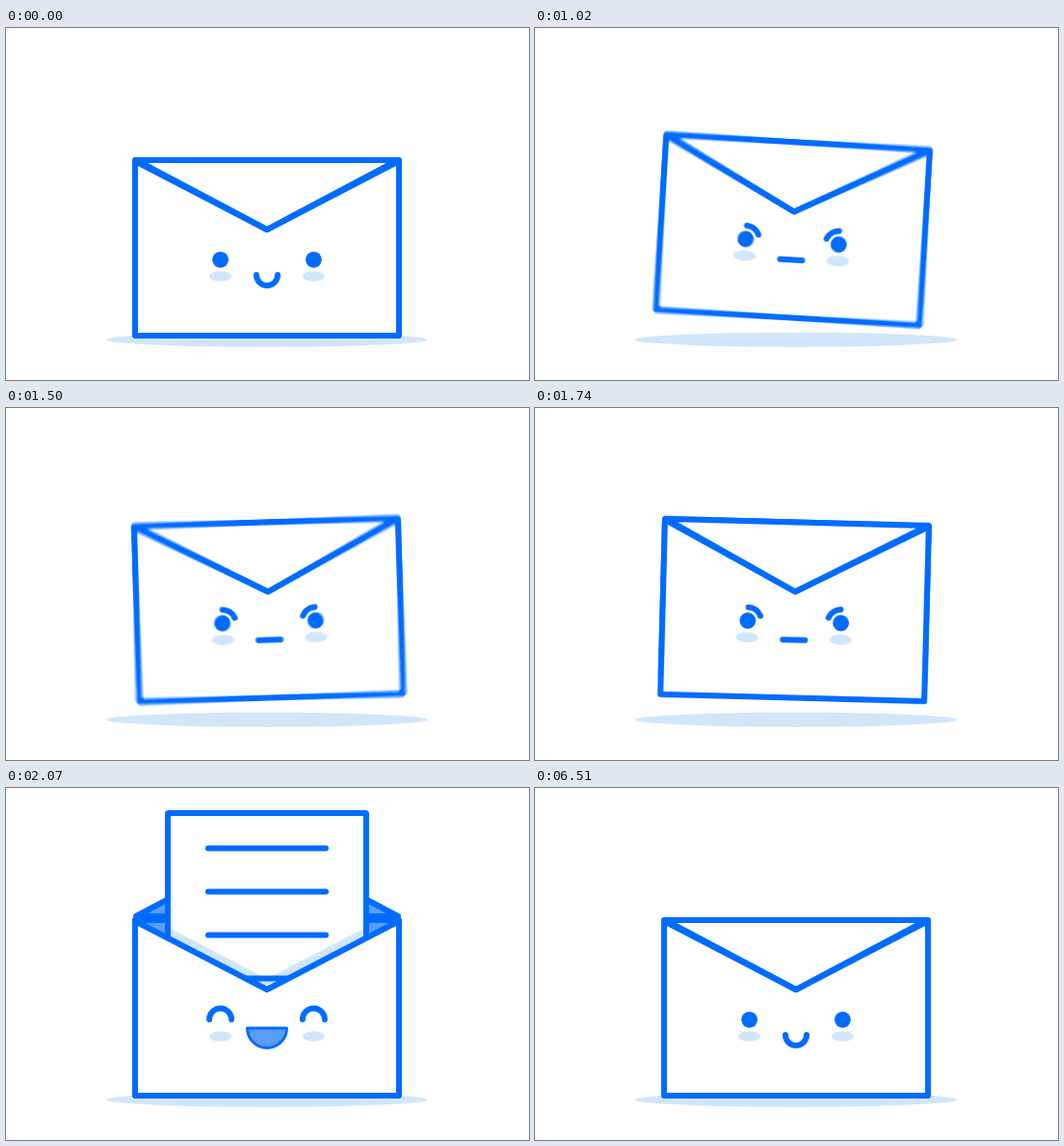
An HTML page with a canvas that plays this animation: 543 px wide and 365 px high, repeating every 7170 ms.

```html
<!DOCTYPE html>
<html lang="en">
<head>
<meta charset="utf-8">
<title>Envelope</title>
<style>
html, body { margin: 0; width: 100%; height: 100%; overflow: hidden; background: #fff; }
canvas { display: block; }
</style>
</head>
<body>
<canvas id="stage" width="543" height="365"></canvas>
<script>
const W = 543, H = 365, LOOP = 7170, STEP = 30, SHUTTER = 15, SAMPLES = 10;
const BLUE = '#006cff', MID = '#5b9cf8', PALE = '#d1e6fb', WHITE = '#fff';
const MID_X = 271, LIFT = 18.5, HIDDEN = 190;

const out = document.getElementById('stage').getContext('2d');
const layer = document.createElement('canvas');
layer.width = W;
layer.height = H;
const c = layer.getContext('2d');

const ramp = (t, a, b) => Math.min(1, Math.max(0, (t - a) / (b - a)));
const smooth = u => u * u * (3 - 2 * u);

function paint(fill, stroke, width = 6) {
  if (fill) { c.fillStyle = fill; c.fill(); }
  if (stroke) { c.strokeStyle = stroke; c.lineWidth = width; c.stroke(); }
}

function poly(points, closed, fill, stroke, width) {
  c.beginPath();
  points.forEach(([x, y]) => c.lineTo(x, y));
  if (closed) c.closePath();
  paint(fill, stroke, width);
}

function oval(x, y, rx, ry, fill) {
  c.beginPath();
  c.ellipse(x, y, rx, ry, 0, 0, 2 * Math.PI);
  paint(fill);
}

function arc(x, y, r, from, to, fill, width) {
  c.beginPath();
  c.arc(x, y, r, from * Math.PI / 180, to * Math.PI / 180);
  if (fill) c.closePath();
  paint(fill, BLUE, width);
}

function pose(t) {
  const shake = 4.4 * ramp(t, 540, 630) * (1 - ramp(t, 1400, 1950));
  const rise = HIDDEN * (1 - ramp(t, 1960, 2030))
    - 12 * ramp(t, 2010, 2035) * (1 - smooth(ramp(t, 2045, 2070)));
  return {
    lift: LIFT * (smooth(ramp(t, 540, 630)) - smooth(ramp(t, 1950, 2010))),
    angle: shake * Math.sin(2 * Math.PI * (t - 657) / 173),
    flap: 1 - 2 * smooth(ramp(t, 1830, 1980)) + 2 * smooth(ramp(t, 6390, 6505)),
    letter: t < 6240 ? rise : HIDDEN * ramp(t, 6240, 6400) ** 1.3,
    band: 1 - ramp(t, 6240, 6255),
    mood: t < 540 || t >= 6390 ? 'calm' : t < 1950 ? 'angry' : 'happy'
  };
}

function drawFlap(s) {
  const y = 135 + 2 * s;
  poly([[135, y], [MID_X, y + 72 * s], [407, y]], true, s > 0 ? WHITE : MID, BLUE);
}

function drawLetter(drop, band) {
  const top = 26 + drop;
  if (drop >= HIDDEN) return;
  c.beginPath();
  c.roundRect(168, top, 206, 300 - top, 1);
  paint(WHITE);
  c.save();
  c.clip();
  c.globalAlpha = band;
  poly([[134, 132], [MID_X, 203], [408, 132]], false, null, PALE, 9);
  c.restore();
  c.beginPath();
  c.roundRect(168, top, 206, 300 - top, 1);
  paint(null, BLUE);
  for (let y = top + 36.5; y < 300; y += 45)
    poly([[210, y], [332, y]], false, null, BLUE);
}

function drawFace(mood) {
  for (const side of [-1, 1]) {
    const x = MID_X + side * 48.4, y = 240.3;
    oval(x, 257.5, 11.5, 5.3, PALE);
    if (mood === 'happy') arc(x, 240, 11.5, 180, 360);
    else oval(x, y, 8.4, 8.4, BLUE);
    if (mood === 'angry')
      arc(x, y, 14, side < 0 ? -88 : -158, side < 0 ? -22 : -92);
  }
  if (mood === 'calm') arc(MID_X, 256, 11, 0, 180);
  else if (mood === 'angry') poly([[259.5, 259], [282.5, 259]], false, null, BLUE);
  else arc(MID_X, 249, 20.5, 0, 180, MID, 3);
}

function drawScene(t) {
  const p = pose(t);
  c.fillStyle = WHITE;
  c.fillRect(0, 0, W, H);
  c.lineCap = c.lineJoin = 'round';
  oval(MID_X, 323.2, 167, 7.5, PALE);

  c.save();
  c.translate(MID_X, 173 - p.lift);
  c.rotate(p.angle * Math.PI / 180);
  c.translate(-MID_X, -173);
  if (p.flap <= 0) drawFlap(p.flap);
  poly([[134, 137], [408, 137], [408, 300], [134, 300]], true, MID, BLUE);
  drawLetter(p.letter, p.band);
  poly([[134, 138], [MID_X, 209], [408, 138], [408, 319], [134, 319]], true, WHITE, BLUE);
  if (p.flap > 0) drawFlap(p.flap);
  drawFace(p.mood);
  c.restore();
}

// Average several moments inside the shutter time for motion blur.
function render(t) {
  for (let i = 0; i < SAMPLES; i++) {
    drawScene(t + SHUTTER * i / (SAMPLES - 1));
    out.globalAlpha = 1 / (i + 1);
    out.drawImage(layer, 0, 0);
  }
}

let start, last;
function tick(now) {
  start ??= now;
  const t = Math.floor((now - start) % LOOP / STEP) * STEP;
  if (t !== last) render(last = t);
  requestAnimationFrame(tick);
}
render(0);
requestAnimationFrame(tick);
</script>
</body>
</html>
```
